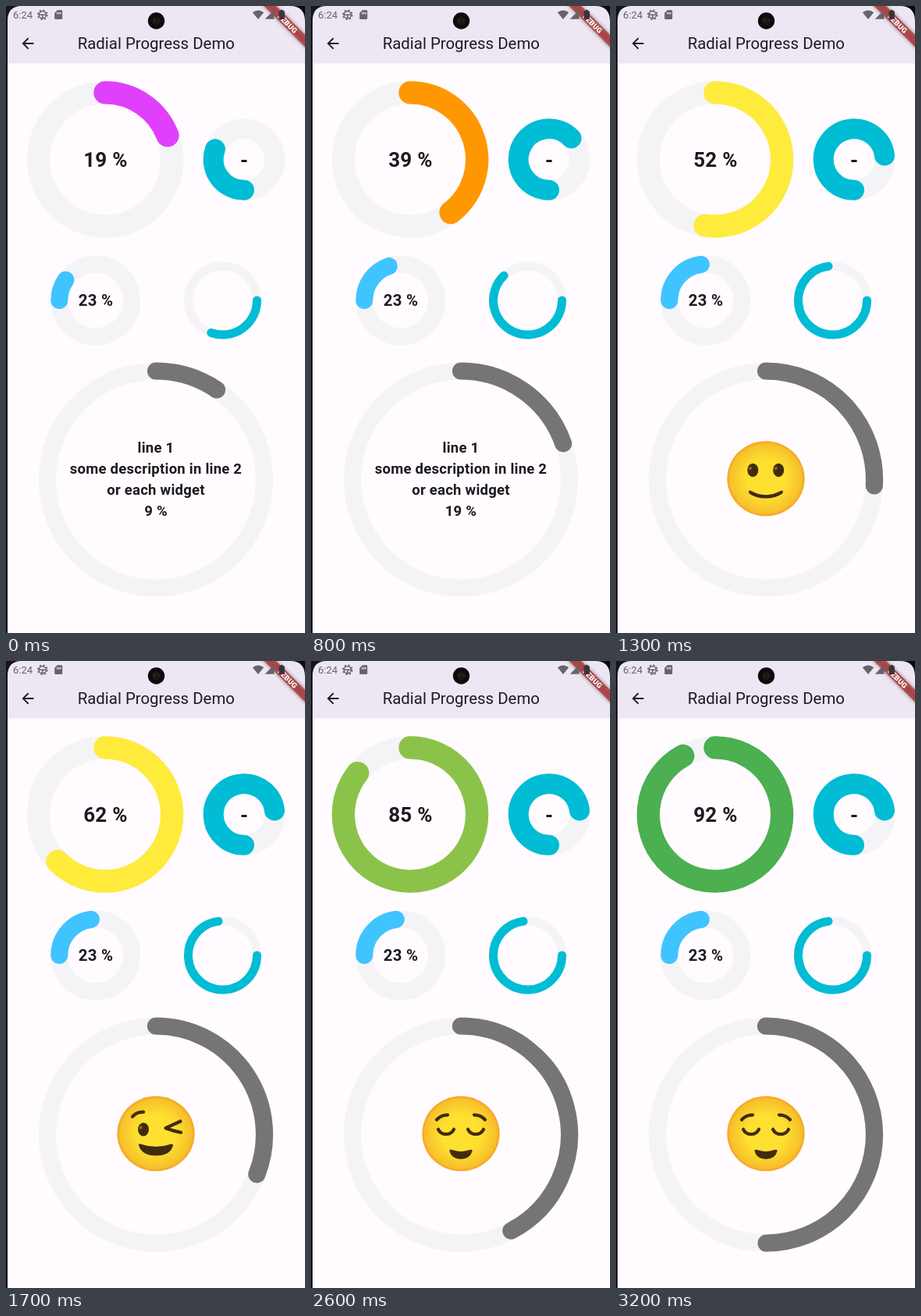
An HTML page for the animation above (3.3 s loop, 383 px wide and 803 px high).

```html
<!DOCTYPE html>
<html lang="en">
<head>
<meta charset="utf-8">
<title>Radial Progress Demo</title>
<style>
  html, body { margin: 0; width: 100%; height: 100%; overflow: hidden; background: #fffbff; }
  svg { display: block; width: 383px; height: 803px; }
  text { font-family: Roboto, "Open Sans", sans-serif; fill: #1c1b1f; text-anchor: middle; }
  .bold { font-weight: 700; letter-spacing: .23px; }
  .big { font-size: 26px; }
  .mid { font-size: 20.4px; }
  .small { font-size: 18.55px; }
  .ring { fill: none; stroke-linecap: round; }
  .status { fill: #66636a; }
  .dark { fill: #422b0d; }
  .line { fill: none; stroke: #422b0d; stroke-width: 4.2; stroke-linecap: round; stroke-linejoin: round; }
  .glint { fill: #896024; }
</style>
</head>
<body>
<svg viewBox="0 0 383 803">
  <defs>
    <radialGradient id="skin">
      <stop offset=".5" stop-color="#fde030"/>
      <stop offset=".92" stop-color="#f7c02b"/>
      <stop offset="1" stop-color="#f4a223"/>
    </radialGradient>
    <filter id="soft" x="-20%" y="-100%" width="140%" height="300%">
      <feGaussianBlur stdDeviation="2.5"/>
    </filter>
    <g id="eye">
      <ellipse class="dark" rx="7" ry="8.6"/>
      <ellipse class="glint" cx="-1.6" cy="-3.8" rx="2.4" ry="2" transform="rotate(-35)"/>
    </g>
  </defs>

  <rect width="383" height="803" fill="#fffbff"/>
  <rect width="383" height="73.5" fill="#ece7f2"/>

  <!-- app bar -->
  <path transform="translate(16.9 36.9) scale(.927)" fill="#1c1b1f"
    d="M20 11H7.83l5.59-5.59L12 4l-8 8 8 8 1.41-1.41L7.83 13H20z"/>
  <text x="192.3" y="54.6" class="mid">Radial Progress Demo</text>

  <!-- rings -->
  <g id="rings"></g>
  <text id="count" x="127.4" y="206.2" class="bold big"></text>
  <text x="305.2" y="206.2" class="bold big">-</text>
  <text x="115" y="384.2" class="bold mid">23 %</text>

  <g id="lines" class="bold small">
    <text x="192" y="572.4">line 1</text>
    <text x="192" y="599.3">some description in line 2</text>
    <text x="192" y="626.2">or each widget</text>
    <text id="part" x="192" y="653.1"></text>
  </g>

  <g id="face">
    <ellipse cx="192" cy="605.3" rx="49.6" ry="48" fill="url(#skin)"/>
    <g class="mood">
      <use href="#eye" x="175.3" y="594.3"/>
      <use href="#eye" x="208.2" y="594.3"/>
      <path class="dark" d="M170.5 620.6Q172 620 173.5 621.3Q191.5 631 210.500 621.3Q212.500 620 213.500 621Q214.500 622.300 213 624.500Q204.500 630.600 192 630.600Q179 630.600 170.800 624.500Q169.200 622.200 170.500 620.600Z"/>
    </g>
    <g class="mood">
      <path class="line" d="M162 583.500Q167 577.300 176 577.600"/>
      <use href="#eye" x="176" y="599.800"/>
      <path class="line" d="M223.500 589.500L204.500 598.200Q214.500 602 224 603.800"/>
      <path class="dark" d="M169.800 619.500Q170.800 617.600 173 618.700Q192 625.500 211 618.700Q213.800 617.800 214 620.300Q211 633.500 192 633.500Q173.500 633.500 169.800 619.500Z"/>
    </g>
    <g class="mood">
      <path class="line" d="M161 587.500Q166.500 581.300 175 581.300M223 587.500Q217.500 581.300 209 581.300"/>
      <path class="line" d="M163 599.800Q166 606 173 606Q180 606 183 599.800M201 599.800Q204 606 211 606Q218 606 221 599.800"/>
      <path class="dark" d="M177.300 627.300Q177.800 625 180.500 626Q192 630.300 203.500 626Q206.300 625 206.700 627.300Q204 638 192 638Q180 638 177.300 627.300Z"/>
    </g>
  </g>

  <!-- debug ribbon -->
  <g transform="translate(383 0) rotate(45)">
    <rect x="-40" y="26" width="80" height="11.200" opacity=".4" filter="url(#soft)"/>
    <rect x="-40" y="26" width="80" height="11.200" fill="#b71c1c" fill-opacity=".63"/>
    <text y="35" font-size="9.500" font-weight="900" style="fill:#fff">DEBUG</text>
  </g>

  <!-- status bar -->
  <g class="status">
    <text x="21.500" y="16" font-size="13" style="fill:#66636a">6:24</text>
    <circle cx="46.800" cy="11.300" r="4.600" fill="none" stroke="#66636a" stroke-width="1.500"/>
    <circle cx="46.800" cy="11.300" r="6" fill="none" stroke="#66636a" stroke-width="1.600" stroke-dasharray="2.200 2.510"/>
    <path d="M43 10.500h7.600v1.500H43zM46 11h1.600v4.500H46z"/>
    <path fill-rule="evenodd" d="M65.800 5.300h5.200q1.200 0 1.200 1.200v9.300q0 1.200-1.200 1.200h-7.600q-1.200 0-1.200-1.200V9zM65 8v2.600h1.300V8zm2.100 0v2.600h1.300V8zm2.100 0v2.600h1.300V8z"/>
    <path d="M315.800 8.200Q323 2.700 330.200 8.200L323 17z"/>
    <path d="M343.500 5v11.800h-11.800z"/>
    <path d="M349.500 6.500h2v-1.500h3.400v1.500h2v10.500h-7.400z" fill="#39343a"/>
  </g>

  <!-- device frame -->
  <path d="M0 0H20Q2 0 2 19V803H0Z" fill="#17141a"/>
  <path d="M364 0H383V20Q383 0 364 0Z" fill="#0b090c"/>
  <circle cx="192.500" cy="19" r="10.700" fill="#0c0b0c"/>
  <circle cx="192.500" cy="19" r="5.500" fill="#191812"/>
  <circle cx="190" cy="18.500" r="1.200" fill="#38341d"/>
  <circle cx="195.500" cy="18.500" r="1.100" fill="#302d1c"/>
</svg>

<script>
  const LOOP = 3300, STEP = 100;
  const LEAD = 7.5; // steps already run when the loop begins
  const byId = id => document.getElementById(id);

  // from: start angle in degrees clockwise from the top; rate: percent per step
  const rings = [
    { x: 127, y: 196.5, r: 85.6, w: 29.3, from: 0, rate: 92 / 36, max: 92 },
    { x: 305, y: 196.5, r: 39.3, w: 26, from: 180, rate: 73 / 18, max: 73, color: '#00bcd4' },
    { x: 114.7, y: 377, r: 46.4, w: 22, from: 270, rate: 23 / 18, max: 23, color: '#40c4ff' },
    { x: 277.5, y: 377, r: 44, w: 11, from: 90, rate: 73 / 18, max: 73, color: '#00bcd4' },
    { x: 192, y: 606.5, r: 139, w: 22.2, from: 0, rate: 1.264, max: 100, color: '#757575' }
  ];

  const shades = [
    [25, '#e040fb'], [35, '#f44336'], [50, '#ff9800'], [65, '#ffeb3b'],
    [80, '#b2ff59'], [90, '#8bc34a'], [101, '#4caf50']
  ];

  function add(tag, attrs) {
    const el = document.createElementNS('http://www.w3.org/2000/svg', tag);
    for (const key in attrs) el.setAttribute(key, attrs[key]);
    return byId('rings').appendChild(el);
  }

  for (const g of rings) {
    add('circle', { class: 'ring', cx: g.x, cy: g.y, r: g.r, stroke: '#f4f4f6', 'stroke-width': g.w });
    g.arc = add('path', { class: 'ring', stroke: g.color || 'none', 'stroke-width': g.w });
  }

  function point(g, deg) {
    const a = deg * Math.PI / 180;
    return `${g.x + g.r * Math.sin(a)} ${g.y - g.r * Math.cos(a)}`;
  }

  function arcPath(g, percent) {
    const sweep = percent * 3.6;
    return `M${point(g, g.from)}A${g.r} ${g.r} 0 ${sweep > 180 ? 1 : 0} 1 ${point(g, g.from + sweep)}`;
  }

  const moods = document.querySelectorAll('.mood');
  let shown = -1;

  function draw(step) {
    const values = rings.map(g => Math.min(g.max, g.rate * (step + LEAD)));
    rings.forEach((g, i) => g.arc.setAttribute('d', arcPath(g, values[i])));

    const main = values[0], part = values[4];
    rings[0].arc.setAttribute('stroke', shades.find(s => main < s[0])[1]);
    byId('count').textContent = Math.floor(main) + ' %';
    byId('part').textContent = Math.floor(part) + ' %';

    const mood = Math.min(2, Math.floor(part / 10) - 2);
    byId('lines').style.display = mood < 0 ? '' : 'none';
    byId('face').style.display = mood < 0 ? 'none' : '';
    moods.forEach((el, i) => el.style.display = i === mood ? '' : 'none');
  }

  const start = performance.now();
  function tick() {
    const step = Math.floor((performance.now() - start) % LOOP / STEP);
    if (step !== shown) draw(shown = step);
    requestAnimationFrame(tick);
  }
  tick();
</script>
</body>
</html>
```
